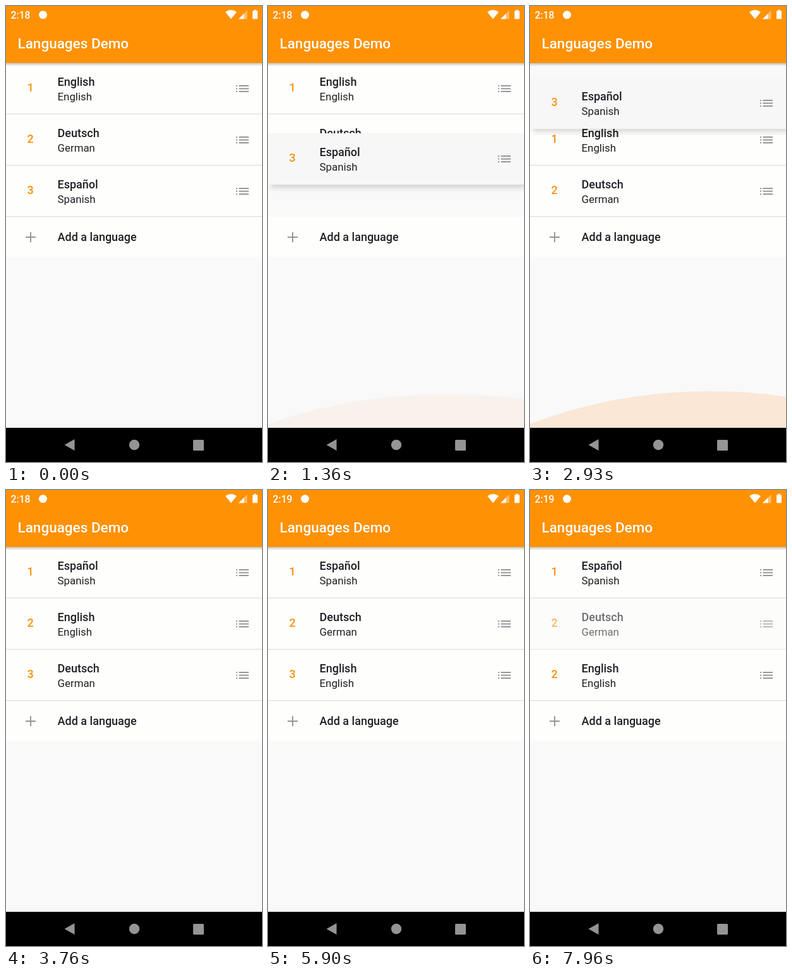
Recreate the animation shown at these times as an HTML page. Size 405 by 720 pixels, loop 8 s.

```html
<!DOCTYPE html>
<html lang="en">
<head>
<meta charset="utf-8">
<title>Languages Demo</title>
<style>
  html, body { margin: 0; width: 100%; height: 100%; overflow: hidden; background: #000; }
  svg { display: block; width: 405px; height: 720px; font: 500 18px Roboto, sans-serif; }
  .ink { fill: #202026; }
  .sub { font-size: 16.875px; font-weight: 400; }
  .num { fill: #f79312; text-anchor: middle; }
  .icon { fill: #97979b; }
  .shadow { filter: blur(4px); }
</style>
</head>
<body>
<svg viewBox="0 0 405 720">
  <rect width="405" height="666" fill="#f9f9fa"/>
  <ellipse id="glow" cx="285" rx="607" fill="#ff9434"/>

  <rect y="333" width="405" height="63" fill="#fefefc"/>
  <path class="icon" d="M31 364h16v2H31zM38 357h2v16h-2z"/>
  <text class="ink" x="81.5" y="371">Add a language</text>

  <g id="rows"></g>

  <linearGradient id="fade" x2="0" y2="1">
    <stop stop-color="#000" stop-opacity=".24"/>
    <stop offset="1" stop-color="#000" stop-opacity="0"/>
  </linearGradient>
  <rect y="90" width="405" height="5" fill="url(#fade)"/>
  <rect width="405" height="90" fill="#ff9104"/>
  <g fill="#fff">
    <text id="clock" x="7.5" y="20" font-size="15.75"></text>
    <circle cx="58.5" cy="14" r="6.5"/>
    <path d="M356 20.5L347 9.5Q356 3 365 9.5Z"/>
    <path d="M368 20.5L381.5 7V20.5Z" opacity=".4"/>
    <path d="M368 20.5L376.5 12V20.5Z"/>
    <path d="M392.500 6h3v1.500h1.500q1 0 1 1v11q0 1-1 1h-6q-1 0-1-1v-11q0-1 1-1h1.500z"/>
    <text x="18.5" y="67" font-size="22.5">Languages Demo</text>
  </g>

  <rect y="666" width="405" height="54" fill="#000"/>
  <g fill="#949494">
    <path d="M92.5 693L108.5 684V702Z"/>
    <circle cx="203" cy="693" r="8.2"/>
    <rect x="296" y="685" width="17" height="17" rx="1.5"/>
  </g>
</svg>
<script>
const LOOP = 8000, PITCH = 81, TOP = 90;
const SETTLE = 250, SHIFT = 250, SHIFT_LAG = 90, GLOW_FADE = 600;
const CLOCK_TICK = 5500;

const $ = id => document.getElementById(id);
const clamp = u => Math.min(1, Math.max(0, u));
const smooth = u => u * u * (3 - 2 * u);
const ramp = (t, start, duration) => clamp((t - start) / duration);
const approach = (t, tau) => 1 - Math.exp(-Math.max(0, t) / tau);

const languages = [['English', 'English'], ['Deutsch', 'German'], ['Español', 'Spanish']]
  .map(([name, english]) => ({ name, english }));
const [english, deutsch, spanish] = languages;

// Each row is pulled up quickly towards `reach` pixels, then released into its new slot.
const drags = [
  { row: spanish, to: 0, start: 1230, drop: 3080, reach: 139, tau: 284 },
  { row: deutsch, to: 1, start: 4930, drop: 5230, reach: 82, tau: 62 }
];
const removal = { row: deutsch, start: 7870, duration: 250 };

$('rows').innerHTML = languages.map(l => `
  <g>
    <rect class="shadow" x="4" y="6" width="405" height="80"/>
    <rect class="face" width="405" height="81"/>
    <rect class="line" y="80" width="405" height="1" fill="#d9d9d9"/>
    <text class="num" x="38.5" y="45"></text>
    <text class="ink" x="81.5" y="36">${l.name}</text>
    <text class="ink sub" x="81.5" y="59">${l.english}</text>
    <path class="icon" d="${[35, 39.5, 44].map(y => `M364 ${y}h2v2h-2zM368.5 ${y}h15.5v2h-15.5z`).join('')}"/>
  </g>`).join('');

languages.forEach((l, i) => {
  l.group = $('rows').children[i];
  for (const part of ['shadow', 'face', 'line', 'num']) l[part] = l.group.querySelector('.' + part);
});

function reorder(order, { row, to }) {
  const next = order.filter(l => l !== row);
  next.splice(to, 0, row);
  return next;
}

function applyDrag(t, order, { row, to, start, drop, reach, tau }) {
  const from = order.indexOf(row);
  const settle = ramp(t, drop, SETTLE);
  const pulled = reach * approach(t - start, tau);
  row.y -= pulled + ((from - to) * PITCH - pulled) * smooth(settle);
  row.lift = ramp(t, start - 180, 150) * (1 - settle);

  // A passed row makes room shortly after the dragged edge crosses its middle.
  for (let k = 1; k <= from - to; k++) {
    const crossing = start - tau * Math.log(1 - (k - .5) * PITCH / reach);
    order[from - k].y += PITCH * smooth(ramp(t, crossing + SHIFT_LAG, SHIFT));
  }
}

function drawRow(l, number, opacity) {
  const shade = (white, lifted) => Math.round(white + (lifted - white) * l.lift);
  l.group.setAttribute('transform', `translate(0 ${Math.round(l.y)})`);
  l.group.setAttribute('opacity', opacity);
  l.shadow.setAttribute('opacity', .15 * l.lift);
  l.face.setAttribute('fill', `rgb(${shade(254, 247)},${shade(254, 247)},${shade(252, 247)})`);
  l.line.setAttribute('opacity', 1 - l.lift);
  l.num.textContent = number;
}

function drawGlow(t) {
  const { start, drop } = drags.findLast(d => d.start <= t) || drags[0];
  const fade = 1 - ramp(t, drop, GLOW_FADE);
  const scale = .73 * approach(t - start, 55) * fade;
  const ry = 607 * scale;
  $('glow').setAttribute('ry', ry);
  $('glow').setAttribute('cy', 660 - 71 * scale + ry);
  $('glow').setAttribute('opacity', .18 * approach(t - start, 260) * fade);
}

function render(t) {
  let order = languages;
  const done = drags.filter(d => t >= d.drop + SETTLE);
  for (const d of done) order = reorder(order, d);
  order.forEach((l, i) => { l.y = TOP + i * PITCH; l.lift = 0; });

  const active = drags[done.length];
  if (active) applyDrag(t, order, active);

  const removed = t >= removal.start ? order.indexOf(removal.row) : Infinity;
  const opacity = 1 - ramp(t, removal.start, removal.duration);
  order.forEach((l, i) => drawRow(l, i > removed ? i : i + 1, l === removal.row ? opacity : 1));

  drawGlow(t);
  $('clock').textContent = t < CLOCK_TICK ? '2:18' : '2:19';
}

const begin = performance.now();
function frame() {
  render((performance.now() - begin) % LOOP);
  requestAnimationFrame(frame);
}
frame();
</script>
</body>
</html>
```
